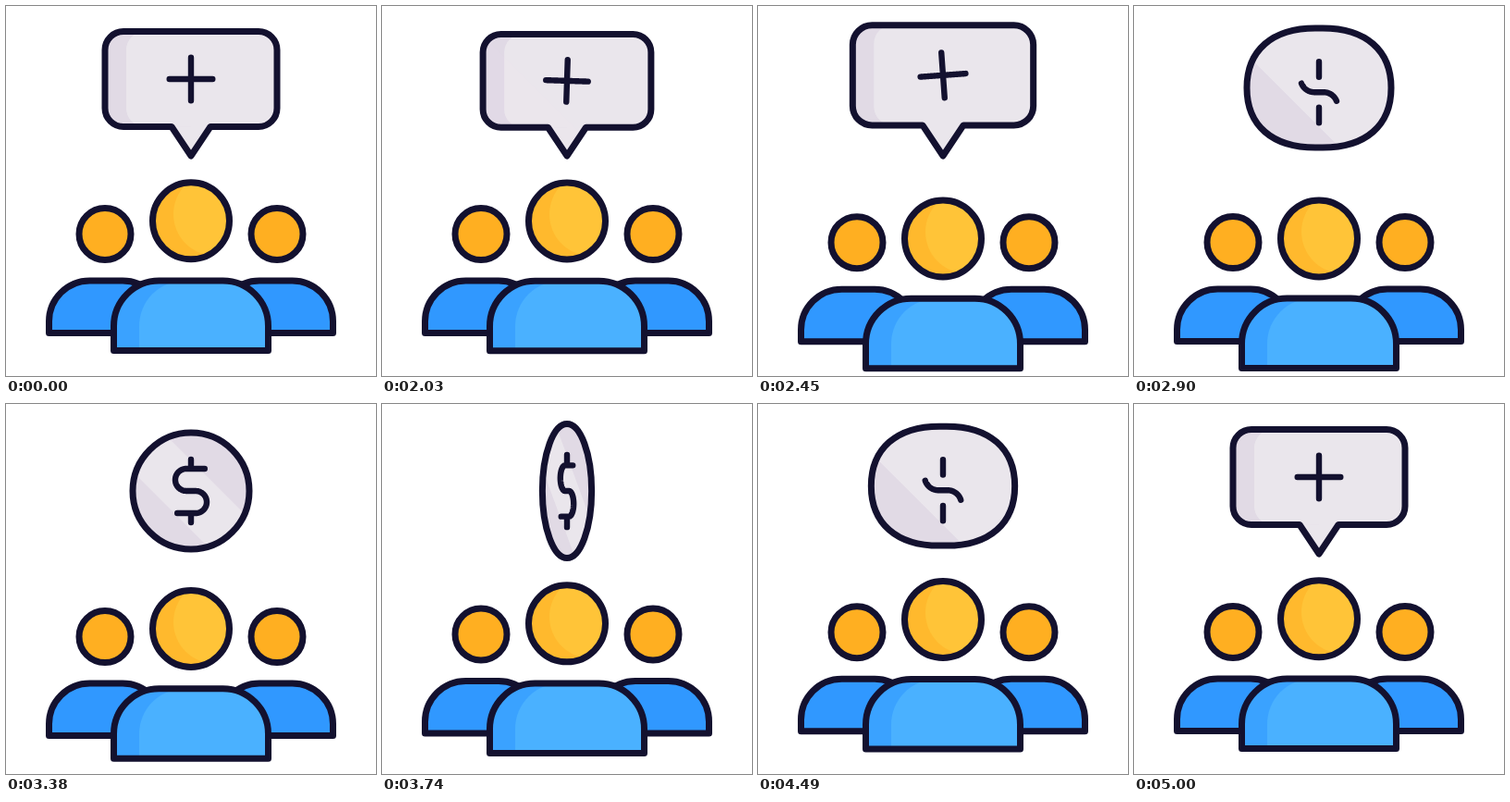
Write an HTML page with a canvas that moves like this. It is 400 by 400 pixels and loops after 5.03 s.

```html
<!DOCTYPE html>
<html>
<head>
<meta charset="utf-8">
<style>
html, body { margin: 0; width: 100%; height: 100%; overflow: hidden; background: #fff; }
canvas { display: block; }
</style>
</head>
<body>
<canvas width="400" height="400"></canvas>
<script>
const ctx = document.querySelector('canvas').getContext('2d');
const LOOP = 5030, START = 2030, TIP = 162, COIN_R = 63;
const INK = '#13112f', LIGHT = '#eae6ec', SHADE = '#e1dae5';
const mix = (a, b, p) => a + (b - a) * p;
const clamp = v => Math.min(1, Math.max(0, v));
const span = (t, a, b) => clamp((t - a) / (b - a));

// cubic-bezier(.333, 0, .2, 1)
function ease(x) {
  let lo = 0, hi = 1;
  for (let i = 0; i < 24; i++) {
    const s = (lo + hi) / 2, r = 1 - s;
    if (s * r * r + 0.6 * s * s * r + s ** 3 < x) lo = s; else hi = s;
  }
  return lo * lo * (3 - 2 * lo);
}

// half width, half height, centre y, corner, corner handle, tail,
// bend, half length, gap, half stem, sign y
const bubble = s => [93 * s, 51.5 * s, TIP - 83 * s, 20 * s, 0.448, s, 0, 23.3 * s, 0, 23.3 * s, TIP - 83 * s];
const blend = [78, 64.5, 88.5, 74, 0.37, 0, 0.8, 23, 16.5, 33, 93.2];
const coin = [COIN_R, COIN_R, 94, COIN_R, 0.448, 0, 1, 62.5, 24, 34, 94];
const keys = [
  [2000, bubble(1)],
  [2200, bubble(0.78)],
  [2490, bubble(1.053)],
  [2900, blend],
  [3200, coin],
  [4330, coin],
  [4530, blend],
  [5000, bubble(1)]
];

function pose(t) {
  let i = 1;
  while (i < keys.length - 1 && t > keys[i][0]) i++;
  const [t0, from] = keys[i - 1], [t1, to] = keys[i];
  const p = ease(span(t, t0, t1));
  return from.map((v, k) => mix(v, to[k], p));
}

function paint(path, fill, details) {
  ctx.fillStyle = fill;
  ctx.fill(path);
  if (details) {
    ctx.save();
    ctx.clip(path);
    details();
    ctx.restore();
  }
  ctx.stroke(path);
}

function circle(x, y, r) {
  const p = new Path2D();
  p.arc(x, y, r, 0, 7);
  return p;
}

const frontBody = new Path2D('M116.5 372.5V346a49 49 0 0 1 49-49H234.5a49 49 0 0 1 49 49V372.5Z');
const sideBody = new Path2D('M46.5 353.5V341a44 44 0 0 1 44-44H126a44 44 0 0 1 44 44V353.5Z');

function people(drop) {
  for (const side of [1, -1]) {
    ctx.save();
    ctx.translate(side > 0 ? 0 : 400, 9.5 * drop);
    ctx.scale(side, 1);
    paint(sideBody, '#3098ff');
    paint(circle(107, 246.5, 28), '#ffaf21');
    ctx.restore();
  }
  ctx.save();
  ctx.translate(0, 20 * drop);
  paint(frontBody, '#3aa2ff', () => {
    ctx.translate(27.5, 0);
    ctx.fillStyle = '#4ab1ff';
    ctx.fill(frontBody);
  });
  paint(circle(200, 232.3, 41.5), '#ffb92d', () => {
    ctx.fillStyle = '#ffc438';
    ctx.fill(circle(226, 225, 45));
  });
  ctx.restore();
}

function panel(w, h, r, k, tail) {
  const p = new Path2D(), x = Math.min(r, w), y = Math.min(r, h);
  p.moveTo(-w + x, -h);
  p.lineTo(w - x, -h);
  p.bezierCurveTo(w - x * k, -h, w, -h + y * k, w, -h + y);
  p.lineTo(w, h - y);
  p.bezierCurveTo(w, h - y * k, w - x * k, h, w - x, h);
  if (tail > 0.01) {
    p.lineTo(21 * tail, h);
    p.lineTo(0, h + 31.5 * tail);
    p.lineTo(-21 * tail, h);
  }
  p.lineTo(-w + x, h);
  p.bezierCurveTo(-w + x * k, h, -w, h - y * k, -w, h - y);
  p.lineTo(-w, -h + y);
  p.bezierCurveTo(-w, -h + y * k, -w + x * k, -h, -w + x, -h);
  p.closePath();
  return p;
}

// dark diagonal stripe between two offsets from the centre
function stripe(from, to, alpha) {
  ctx.globalAlpha = alpha;
  ctx.fillStyle = SHADE;
  ctx.beginPath();
  ctx.moveTo(from - 150, -150);
  ctx.lineTo(to - 150, -150);
  ctx.lineTo(to + 150, 150);
  ctx.lineTo(from + 150, 150);
  ctx.fill();
}

function sign(bend, length, gap, stem, sx, sy) {
  const n = 60, step = length / n, arcStart = 5, arcEnd = arcStart + 12 * Math.PI;
  const along = s => Math.min(arcEnd, Math.max(arcStart, s));
  ctx.beginPath();
  for (const side of [1, -1]) {
    ctx.moveTo(0, 0);
    let x = 0, y = 0, angle = 0;
    for (let i = 0; i < n; i++) {
      const turn = bend / 12 * (along((i + 1) * step) - along(i * step));
      angle += turn / 2;
      x += Math.cos(angle) * step;
      y += Math.sin(angle) * step;
      angle += turn / 2;
      ctx.lineTo(side * x * sx, side * y * sy);
    }
    ctx.moveTo(0, side * gap * sy);
    ctx.lineTo(0, side * stem * sy);
  }
  ctx.stroke();
}

function badge(t) {
  const [w, h, cy, r, handle, tail, bend, length, gap, stem, signY] = pose(t);
  const first = span(t, 2930, 3380);
  const turn = Math.PI * (first * first * (3 - 2 * first) + span(t, 3380, 4380));
  const sx = Math.max(0.02, Math.abs(Math.cos(turn)));
  const sy = 1 + 0.167 * Math.abs(Math.sin(turn));

  ctx.save();
  ctx.translate(200, cy);
  const outline = new Path2D();
  outline.addPath(panel(w, h, r, handle, tail), new DOMMatrix([sx, 0, 0, sy, 0, 0]));
  paint(outline, LIGHT, () => {
    ctx.scale(sx, sy);
    const strip = new Path2D();
    strip.rect(-w - 5, -h - 5, 2 * w + 10, 2 * h + 10);
    strip.roundRect(-w + 23, -h, 2 * w + 40, 2 * h, Math.min(r, 20));
    ctx.globalAlpha = clamp(tail);
    ctx.fillStyle = SHADE;
    ctx.save();
    ctx.beginPath();
    ctx.rect(-w, -h, w, 2 * h);
    ctx.clip();
    ctx.fill(strip, 'evenodd');
    ctx.restore();
    const coinness = 1 - clamp(tail);
    stripe(-240, -42, coinness);
    stripe(33, 240, coinness * span(length, 25, 60));
  });
  ctx.restore();

  ctx.save();
  ctx.translate(200, signY);
  ctx.rotate(Math.PI * ease(span(t, 2000, 2560)));
  ctx.lineWidth = 6.4;
  sign(bend, length, gap, stem, sx, sy);
  ctx.restore();
}

function draw(now) {
  let t = now % LOOP;
  if (t < START) t = 2000;
  ctx.fillStyle = '#fff';
  ctx.fillRect(0, 0, 400, 400);
  ctx.strokeStyle = INK;
  ctx.lineWidth = 7;
  ctx.lineCap = ctx.lineJoin = 'round';
  people(ease(span(t, 2000, 2600)) - ease(span(t, 2650, 5000)));
  badge(t);
}

const begin = performance.now();
function frame() {
  draw(performance.now() - begin);
  requestAnimationFrame(frame);
}
frame();
</script>
</body>
</html>
```
